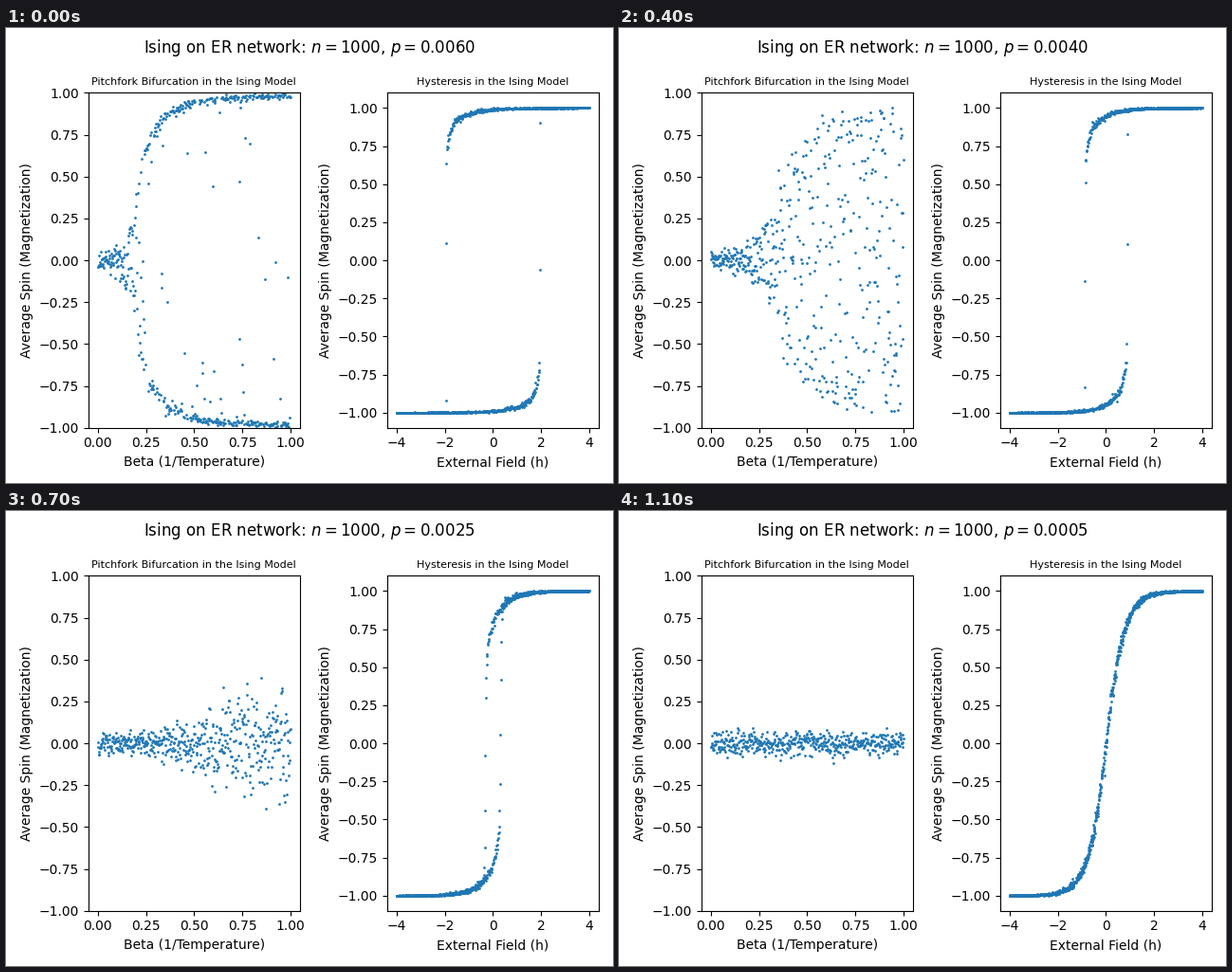
A matplotlib script for the animation above (1.2 s loop, 640 by 480 pixels).

```python
import numpy as np
import matplotlib.pyplot as plt
from matplotlib.animation import FuncAnimation

N = 1000
STEPS = 500
FRAMES = 12
SPIN = "Average Spin (Magnetization)"

beta = np.linspace(0, 1, STEPS)
field = np.linspace(-4, 4, STEPS)


def pitchfork(k, rng):
    """Magnetization after a short quench from a random state, mean degree k."""
    u = beta * k
    ordered = 0.99 * (1 - np.maximum(u, 1) ** -(1.1 + 0.28 * k))
    limit = np.maximum(ordered, 0.2)
    e = k - 0.5
    growth = np.exp((0.72 * e + 0.07 * e**2) * u**4 / (u**4 + 2))
    x = 0.035 * rng.standard_normal(STEPS) * growth
    m = x / np.cbrt(1 + np.abs(x / limit) ** 3)
    noise = 0.04 * np.sqrt(1 - limit**2) * rng.standard_normal(STEPS)
    m += np.where(ordered > 0.3, noise, 0)
    return np.clip(m, -1, 1)


def rising(h, k):
    """Mean magnetization while the field is swept upwards."""
    if k < 1.25:
        return np.tanh((0.8 + 0.84 * k) * np.sign(h) * np.abs(h) ** (1.12 - 0.4 * k))
    e = k - 1.5
    flip = 0.07 + 0.202 * e + 0.048 * e**2

    def branch(d):
        d = np.maximum(d, 0)
        slow = 0.85 / k * np.exp(-(2 - 0.1 * k) * d)
        return 1 - slow - 0.2 * np.exp(-d / 0.12)

    width = 0.004 + 0.03 * np.exp(-e)
    w = 0.5 + 0.5 * np.tanh((h - flip) / (2 * width))
    return w * branch(h + flip) - (1 - w) * branch(flip - h)


def hysteresis(k, rng):
    m = np.concatenate([rising(field, k), -rising(-field, k)])
    m += 0.03 * np.sqrt(np.clip(1 - m**2, 0, 1)) * rng.standard_normal(m.size)
    return np.clip(m, -1, 1)


def heading(p):
    return f"Ising on ER network: $n={N}$, $p={p:.4f}$"


def panel(ax, title, xlabel, xlim, ylim, xticks):
    ax.set_title(title, fontsize=8)
    ax.set_xlabel(xlabel)
    ax.set_ylabel(SPIN)
    ax.set_xticks(xticks)
    ax.set_yticks(np.linspace(-1, 1, 9))
    ax.set_xlim(*xlim)
    ax.set_ylim(*ylim)
    return ax.scatter([], [], s=1, color="C0")


fig, (left, right) = plt.subplots(1, 2, figsize=(6.4, 4.8), dpi=100)
title = fig.suptitle(heading(0.006))
fork = panel(left, "Pitchfork Bifurcation in the Ising Model",
             "Beta (1/Temperature)", (-0.05, 1.05), (-1, 1),
             np.linspace(0, 1, 5))
loop = panel(right, "Hysteresis in the Ising Model",
             "External Field (h)", (-4.4, 4.4), (-1.1, 1.1),
             [-4, -2, 0, 2, 4])
fig.tight_layout()


def update(i):
    p = 0.006 - 0.0005 * i
    rng = np.random.default_rng(40 + i)
    title.set_text(heading(p))
    fork.set_offsets(np.column_stack([beta, pitchfork(N * p, rng)]))
    loop.set_offsets(np.column_stack([np.tile(field, 2), hysteresis(N * p, rng)]))
    return title, fork, loop


anim = FuncAnimation(fig, update, frames=FRAMES, interval=100,
                     repeat=True, repeat_delay=0, blit=False)
plt.show()
```
